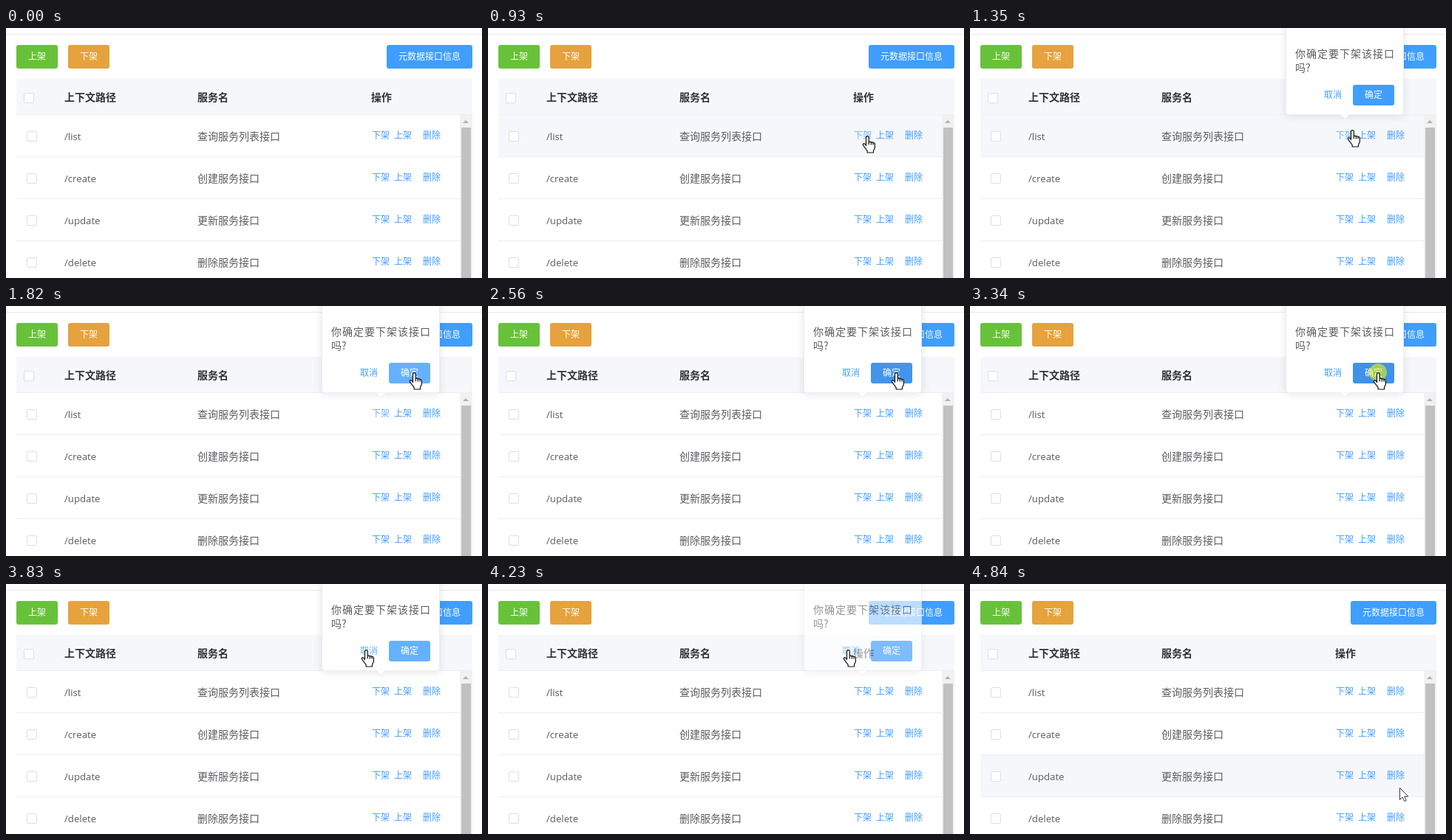
An HTML page that plays this animation: 644 px wide and 339 px high, repeating every 5.04 s.

```html
<!DOCTYPE html>
<html lang="zh-CN">
<head>
<meta charset="utf-8">
<style>
html, body { margin: 0; width: 100%; height: 100%; overflow: hidden; background: #fff; }
body { position: relative; font: 14px/20px "Noto Sans CJK SC", "Noto Sans CJK", sans-serif; color: #5a5c60; }
div, svg { position: absolute; box-sizing: border-box; white-space: nowrap; }
.small { font-size: 12px; line-height: 18px; }
.latin { font: 13.2px/20px "Open Sans", sans-serif; }
.head { font-weight: 700; color: #303133; }
.button { border-radius: 3px; }
.check { width: 14px; height: 14px; border: 1px solid #dcdfe6; border-radius: 2px; background: #fff; }
.row { left: 14px; width: 600px; height: 57px; border-bottom: 1px solid #ebeef5; }
#popup { left: 0; top: 0; width: 644px; height: 339px; }
#card { left: 427px; top: -30px; width: 160px; height: 148px; background: #fff; border: 1px solid #ebeef5;
  border-radius: 4px; box-shadow: 0 2px 12px rgba(0,0,0,.1); }
#question { left: 440px; top: 25px; width: 134px; line-height: 19px; white-space: normal; text-align: justify; word-break: break-all; }
#ring { width: 24px; height: 24px; margin: -12px; border-radius: 50%; background: rgba(255,255,0,.52); }
#hand, #arrow { left: 0; top: 0; overflow: visible; }
</style>
</head>
<body>
<script>
const LOOP = 5040;
const BLUE = [64, 158, 255], LIGHT = [102, 177, 255], ACTIVE = [58, 142, 230];
const WHITE = [255, 255, 255], HOVER = [245, 247, 251];
const rgb = c => `rgb(${c})`;
const mix = (a, b, k) => a.map((v, i) => v + (b[i] - v) * k);
const within = (v, from, to) => v >= from && v < to;

function add(parent, x, y, text = "", className = "", style = {}) {
  const el = document.createElement("div");
  el.textContent = text;
  el.className = className;
  Object.assign(el.style, { left: x + "px", top: y + "px" }, style);
  parent.append(el);
  return el;
}
const box = (parent, x, y, w, h, background, className = "") =>
  add(parent, x, y, "", className, { width: w + "px", height: h + "px", background });
const label = (parent, x, y, text, color) => add(parent, x, y, text, "small", { color });

// Page
const page = document.body;
box(page, 0, 8, 644, 1, "#e8ebf0");
box(page, 14, 23, 56, 32, "#67c23a", "button");
box(page, 84, 23, 56, 32, "#e6a23c", "button");
box(page, 515, 23, 116, 32, rgb(BLUE), "button");
label(page, 30, 29, "上架", "#fff");
label(page, 100, 29, "下架", "#fff");
label(page, 531, 29, "元数据接口信息", "#fff");

// Table
box(page, 14, 69, 617, 49, rgb(HOVER)).style.borderBottom = "1px solid #ebeef5";
add(page, 24, 88, "", "check");
[[79, "上下文路径"], [259, "服务名"], [494, "操作"]].forEach(([x, text]) => add(page, x, 83, text, "head"));

const actions = [["下架", 495], ["上架", 525], ["删除", 564]];
const links = [];
const rows = [["/list", "查询服务列表接口"], ["/create", "创建服务接口"], ["/update", "更新服务接口"], ["/delete", "删除服务接口"]]
  .map(([path, name], i) => {
    const y = 118 + 57 * i;
    const row = add(page, 14, y, "", "row");
    add(page, 28, y + 22, "", "check");
    add(page, 79, y + 19, path, "latin");
    add(page, 259, y + 18, name);
    for (const [text, x] of actions)
      links.push({ el: label(page, x, y + 18, text, rgb(BLUE)), x, y: y + 19, w: 24, h: 17 });
    return { el: row, y };
  });

// Scrollbar
box(page, 614, 118, 17, 221, "#f1f1f1");
box(page, 616, 135, 13, 204, "#c1c1c1");
box(page, 618, 125, 8, 4, "#b0b0b0").style.clipPath = "polygon(50% 0, 100% 100%, 0 100%)";

// Confirmation popup and pointer
page.insertAdjacentHTML("beforeend", `
<div id="popup">
  <div id="card"></div>
  <svg style="left:500px;top:116px" width="14" height="9"><path d="M1 1.5L7 7.5L13 1.5" fill="#fff" stroke="#ebeef5"/><path d="M0 0H14V1H0z" fill="#fff"/></svg>
  <div id="question">你确定要下架该接口吗?</div>
</div>
<div id="ring"></div>
<svg id="hand" width="19" height="25" fill="#fff" stroke="#111" stroke-width="1.2" stroke-linejoin="round">
  <path d="M5.5 13.5V2.6a1.9 1.9 0 0 1 3.8 0V8.6q1.7-1.2 3 .4q1.7-.8 2.7.7q2-.6 2.4 1.3v5.2l-1.9 4v2.8h-8.3v-2.4l-5.6-7.4q-.9-2.2 1.2-2.6q1.4.2 2.7 2.9z"/>
  <path d="M9.3 8.6v3.6M12.3 9v3.4M15 9.7v2.8"/>
</svg>
<svg id="arrow" width="13" height="20" fill="#fff" stroke="#38343f">
  <path d="M.5.5v16l3.6-3.5 2.6 5.6 2.6-1.1-2.5-5.4h5z"/>
</svg>`);
const [popup, ring, hand, arrow] = ["popup", "ring", "hand", "arrow"].map(id => document.getElementById(id));
const confirm = { el: box(popup, 518, 77, 56, 28, rgb(BLUE), "button"), x: 518, y: 77, w: 56, h: 28 };
label(popup, 534, 81, "确定", "#fff").style.fontWeight = 500;
const cancel = { el: label(popup, 479, 81, "取消", rgb(BLUE)), x: 479, y: 77, w: 24, h: 28 };

// Pointer stops: time, x, y
const stops = [
  [190, 602, 316], [400, 580, 250], [600, 545, 168], [730, 525, 152], [860, 513, 147],
  [1290, 513, 147], [1560, 530, 112], [1750, 551, 91], [1820, 552, 91],
  [3420, 552, 91], [3650, 497, 90], [3830, 487, 90],
  [4250, 487, 90], [4420, 520, 150], [4580, 568, 253], [4770, 582, 276], [LOOP, 582, 276]
];
function pointer(t) {
  if (t < stops[0][0]) return null;
  const i = stops.findIndex(s => s[0] > t);
  const [t0, x0, y0] = stops[i - 1], [t1, x1, y1] = stops[i];
  const k = (t - t0) / (t1 - t0);
  return [x0 + (x1 - x0) * k, y0 + (y1 - y0) * k];
}

const isOpen = t => within(t, 1140, 4165);
const pressingConfirm = t => within(t, 2080, 3380) && (t - 1990) % 210 < 130;
const pressing = t => within(t, 1070, 1140) || pressingConfirm(t) || within(t, 4100, 4165);

function over(target, t) {
  const p = pointer(t);
  return !!p && within(p[0], target.x, target.x + target.w) && within(p[1], target.y, target.y + target.h);
}
function overRow(row, t) {
  const p = pointer(t);
  return !!p && within(p[1], row.y, row.y + 57);
}
// A linear transition: the share of the last `duration` ms in which the state held
function eased(state, t, duration) {
  let sum = 0;
  for (let i = 0; i < 20; i++) sum += state(t - duration * (i + 0.5) / 20);
  return sum / 20;
}

function draw(t) {
  for (const row of rows)
    row.el.style.background = rgb(mix(WHITE, HOVER, eased(s => overRow(row, s), t, 250)));

  links.forEach((link, i) => {
    const lit = s => over(link, s) || (i === 0 && within(s, 1070, 2080));
    link.el.style.color = rgb(mix(BLUE, LIGHT, eased(lit, t, 100)));
  });

  const opacity = eased(isOpen, t, 200);
  popup.style.opacity = opacity;
  const confirmLit = s => within(s, 2080, 4100) || over(confirm, s);
  const base = mix(BLUE, LIGHT, eased(confirmLit, t, 100));
  confirm.el.style.background = rgb(mix(base, ACTIVE, eased(pressingConfirm, t, 100)));
  cancel.el.style.color = rgb(mix(BLUE, LIGHT, eased(s => over(cancel, s), t, 100)));

  const p = pointer(t);
  const onControl = links.some(l => over(l, t)) || (opacity > 0 && (over(confirm, t) || over(cancel, t)));
  const show = (el, visible, dx, dy) => {
    el.style.display = p && visible ? "block" : "none";
    if (p) el.style.transform = `translate(${Math.round(p[0]) + dx}px, ${Math.round(p[1]) + dy}px)`;
  };
  show(ring, pressing(t), 0, -1);
  show(hand, onControl, -7, -1);
  show(arrow, !onControl, -1, 0);
}

const start = performance.now();
function frame() {
  draw((performance.now() - start) % LOOP);
  requestAnimationFrame(frame);
}
frame();
</script>
</body>
</html>
```
